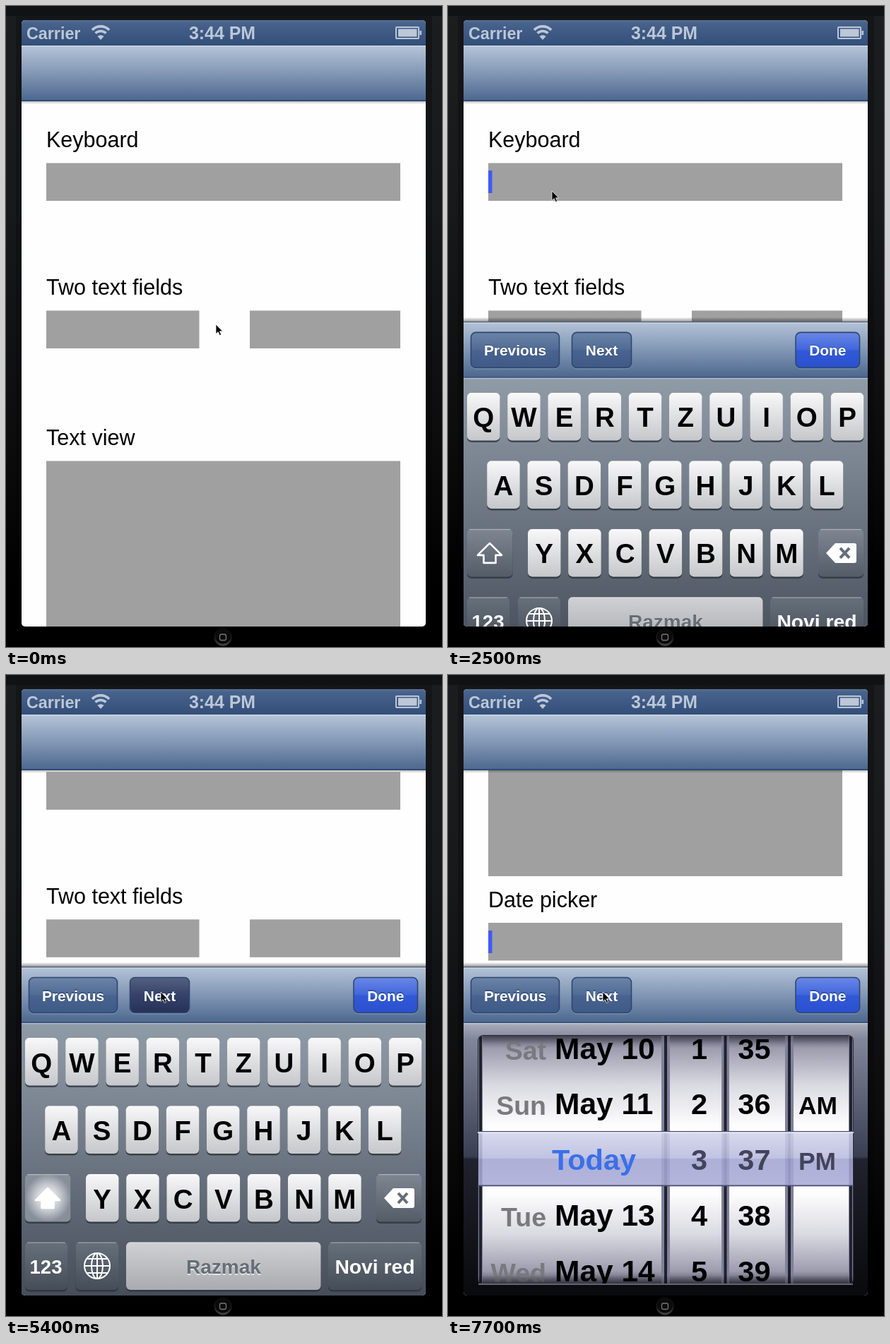
Write an HTML page that moves like this. It is 617 px wide and 908 px high and loops after 8 s.

```html
<!DOCTYPE html>
<html lang="en">
<head>
<meta charset="utf-8">
<title>Form keyboard toolbar</title>
<style>
html, body { margin: 0; width: 100%; height: 100%; overflow: hidden; background: #050506; }
svg { display: block; width: 617px; height: 908px; }
text { font-family: "Liberation Sans", Arial, Helvetica, sans-serif; white-space: pre; }
.b { font-weight: bold; }
</style>
</head>
<body>
<svg id="stage" viewBox="0 0 617 908" xmlns="http://www.w3.org/2000/svg"></svg>
<script>
const stage = document.getElementById('stage');

const rect = (x, y, w, h, fill, more = '') =>
  `<rect x="${x}" y="${y}" width="${w}" height="${h}" fill="${fill}" ${more}/>`;
const text = (x, y, size, str, fill = '#000', more = '') =>
  `<text x="${x}" y="${y}" font-size="${size}" fill="${fill}" ${more}>${str}</text>`;
const bold = (x, y, size, str, fill, anchor = 'middle', more = '') =>
  text(x, y, size, str, fill, `class="b" text-anchor="${anchor}" ${more}`);
const path = (d, more) => `<path d="${d}" ${more}/>`;

// Vertical gradient; stops are "offset colour opacity"
const grad = (id, ...stops) =>
  `<linearGradient id="${id}" x2="0" y2="1">${stops.map(s => {
    const [o, c, a = 1] = s.split(' ');
    return `<stop offset="${o}" stop-color="${c}" stop-opacity="${a}"/>`;
  }).join('')}</linearGradient>`;

const defs = `<defs>
  ${grad('body', '0 #1c1d1f', '.3 #18191b', '.7 #0b0b0c', '.9 #000')}
  ${grad('status', '0 #566f95', '.12 #47628b', '1 #334e78')}
  ${grad('bar', '0 #b5c4d8', '.48 #8499b6', '1 #4b668d')}
  ${grad('fade', '0 #000 .25', '1 #000 0')}
  ${grad('rise', '0 #000 0', '1 #000 .4')}
  ${grad('btn', '0 #6c84a7', '.48 #506b95', '.52 #486390', '1 #3f5a85')}
  ${grad('press', '0 #56617f', '.48 #36426a', '1 #263157')}
  ${grad('done', '0 #6b87e6', '.48 #4167dc', '.52 #3159d6', '1 #2b50cf')}
  ${grad('board', '0 #909ba8', '.3 #7c8692', '1 #454e59')}
  ${grad('key', '0 #f8f8f9', '1 #c6c7ca')}
  ${grad('dark', '0 #7d8691', '1 #535c67')}
  ${grad('low', '0 #66707b', '1 #454d58')}
  ${grad('space', '0 #d0d1d4', '1 #a9abb0')}
  ${grad('home', '0 #101011', '.6 #1c1c1d', '1 #4a4a4c')}
  ${grad('case', '0 #a9adbb', '.06 #81869a', '.49 #3a3e51', '.5 #20222d', '1 #090a0d')}
  ${grad('wheel', '0 #555568', '.05 #9c9cae', '.2 #dadae2', '.36 #fdfdfe', '.64 #fdfdfe', '.8 #dadae2', '.95 #9c9cae', '1 #555568')}
  ${grad('band', '0 #d3d5ec', '.49 #b9bbdf', '.51 #a3a5d3', '1 #a9abd8')}
  <radialGradient id="glow"><stop offset=".1" stop-color="#f6f7f8"/><stop offset=".55" stop-color="#c6cad0"/><stop offset="1" stop-color="#878f9b"/></radialGradient>
  <clipPath id="screen"><rect x="22" y="20" width="572" height="859" rx="5"/></clipPath>
  <clipPath id="view"><rect x="22" y="135" width="572" height="744"/></clipPath>
  <clipPath id="drum"><rect x="43" y="511" width="530" height="351" rx="6"/></clipPath>
</defs>`;

function statusBar() {
  const c = '#bcc7d8';
  const arc = r => path(`M${134 - r * .71} ${46 - r * .71}A${r} ${r} 0 0 1 ${134 + r * .71} ${46 - r * .71}`,
    `fill="none" stroke="${c}" stroke-width="3.6"`);
  return rect(22, 20, 572, 36, 'url(#status)')
    + bold(29, 47, 23.3, 'Carrier', c, 'start') + bold(306, 47, 24.9, '3:44 PM', c)
    + arc(17) + arc(10.5) + path('M134 48l-4.5-5a6.5 6.5 0 0 1 9 0z', `fill="${c}"`)
    + rect(552, 30, 32, 16, 'none', `stroke="${c}" stroke-width="2" rx="1"`)
    + rect(555, 32.5, 26.5, 11, c) + rect(585.5, 35, 2.5, 6, c);
}

function navBar() {
  return rect(22, 56, 572, 79, 'url(#bar)') + rect(22, 56, 572, 1.5, '#cdd8e5')
    + rect(22, 133, 572, 2, '#2f4a77') + rect(22, 135, 572, 4, 'url(#fade)');
}

function form() {
  const g = '#a0a0a0';
  const label = (y, s) => text(57, y, 30.5, s);
  return label(200, 'Keyboard') + rect(57, 222.5, 501, 53.5, g)
    + label(409, 'Two text fields') + rect(57, 431.5, 216.5, 53.5, g) + rect(345, 431.5, 213, 53.5, g)
    + label(622, 'Text view') + rect(57, 644.5, 501, 357.5, g)
    + label(1046, 'Date picker') + rect(57, 1068, 501, 53.5, g)
    + rect(0, 0, 5.5, 32, '#3d5cf5', 'id="caret"');
}

function toolbar() {
  const button = (x, w, s, fill, id) =>
    rect(x, 430, w, 50.5, '#93a9c5', 'rx="8" opacity=".6"')
    + rect(x + .5, 428.5, w - 1, 50, `url(#${fill})`, `id="${id}" rx="7" stroke="#2e4670" stroke-width="1.6"`)
    + bold(x + w / 2, 460, 20.9, s, '#2c4268', 'middle', 'opacity=".6"')
    + bold(x + w / 2, 461.5, 20.9, s, '#fff');
  return rect(22, 407, 572, 6, 'url(#rise)') + rect(22, 413, 572, 80, 'url(#bar)')
    + rect(22, 413, 572, 1.5, '#4b5b72') + rect(22, 414.5, 572, 1.5, '#c5d2e2')
    + rect(22, 491.5, 572, 1.5, '#344e78')
    + button(32, 126, 'Previous', 'btn', 'prev') + button(175, 85, 'Next', 'btn', 'next')
    + button(491.5, 91.5, 'Done', 'done', 'done-btn');
}

function keyboard() {
  const cap = (x, y, w, fill, id = '') =>
    rect(x, y + 2, w, 68, '#29313a', 'rx="6" opacity=".75"')
    + rect(x, y, w, 67.5, `url(#${fill})`, `rx="6" ${id}`)
    + rect(x + 3, y, w - 6, 1.3, '#fff', 'opacity=".35"');
  const row = (keys, x0, y) => [...keys].map((k, i) => {
    const x = x0 + i * 57.2;
    return cap(x, y, 46.5, 'key') + bold(x + 23.2, y + 48.5, 38.5, k, '#000');
  }).join('');
  const arrow = 'M59 727l17 17h-8.5v11h-17v-11h-8.5z';
  const globe = [18, 8].map(r => `<ellipse cx="129" cy="837" rx="${r}" ry="18"/>`).join('')
    + '<path d="M129 819v36M111 837h36M114.5 827h29M114.5 847h29"/>';
  return rect(22, 493, 572, 386, 'url(#board)') + rect(22, 493, 572, 1.5, '#b1bac5')
    + row('QWERTZUIOP', 27, 514) + row('ASDFGHJKL', 55.2, 610.5) + row('YXCVBNM', 113, 707)
    + cap(27, 707, 64.5, 'dark', 'id="shift"')
    + path(arrow, 'id="arrow" fill="none" stroke="#fff" stroke-width="2.6" stroke-linejoin="round"')
    + cap(524, 707, 64, 'dark')
    + path('M535 741l13-14h27q3 0 3 3v22q0 3-3 3h-27z', 'fill="#fff"')
    + path('M555 734l13 14m0-14l-13 14', 'stroke="#646d78" stroke-width="4"')
    + cap(27, 803.5, 60, 'low') + bold(56.5, 848, 27.5, '123', '#fff')
    + cap(98.5, 803.5, 60.5, 'low') + `<g fill="none" stroke="#fff" stroke-width="2">${globe}</g>`
    + cap(170, 803.5, 275.5, 'space')
    + bold(308, 849.5, 28, 'Razmak', '#e4e5e7') + bold(308, 848, 28, 'Razmak', '#666d77')
    + cap(456, 803.5, 132, 'low') + bold(522, 848, 28.3, 'Novi red', '#fff');
}

function picker() {
  const days = ['Sat', 'Sun', '', 'Tue', 'Wed'];
  const chosen = '#43435a';
  const rows = days.map((d, i) => {
    const y = 543.5 + i * 78.8, c = d ? '#000' : chosen;
    return (d ? bold(139, y + 1, 37.5, d, '#79797e', 'end') + bold(151, y, 42.5, 'May ' + (10 + i), c, 'start')
              : bold(147, y, 41.5, 'Today', '#3a70e8', 'start'))
      + bold(367, y, 41.5, i + 1, c, 'end') + bold(456.5, y, 41.5, 35 + i, c, 'end');
  }).join('');
  const gap = (x, w) => rect(x, 511, w, 351, '#7f8098') + rect(x + w / 2 - 2, 511, 4, 351, '#20212e');
  const gaps = gap(43, 6) + gap(302, 12) + gap(387, 11) + gap(477, 12) + gap(567, 6);
  return rect(22, 493, 572, 386, 'url(#case)') + rect(22, 493, 572, 1.5, '#c3c7d2')
    + rect(42, 510, 532, 354, '#262835', 'rx="8"')
    + `<g clip-path="url(#drum)">${rect(43, 511, 530, 351, 'url(#wheel)')}${gaps}`
    + rect(43, 647, 530, 76, 'url(#band)', 'opacity=".88"') + rows
    + bold(496, 622, 35.4, 'AM', '#000', 'start') + bold(496, 701, 35.4, 'PM', chosen, 'start')
    + rect(43, 511, 530, 12, 'url(#fade)') + rect(43, 850, 530, 12, 'url(#rise)') + '</g>'
    + rect(42, 646, 532, 1.5, '#4b4e72') + rect(42, 647.5, 532, 1.5, '#f0f1fb')
    + rect(42, 722.5, 532, 1.8, '#4b4e72')
    + rect(43, 862, 530, 2, '#626578');
}

stage.innerHTML = defs + rect(0, 0, 617, 908, 'url(#body)') + rect(0, 0, 617, 14, '#111214')
  + rect(14, 14, 589, 880, '#000', 'opacity=".25"')
  + '<circle cx="307" cy="894" r="12.5" fill="url(#home)"/><circle cx="307" cy="892.5" r="11" fill="#0b0b0c"/>'
  + rect(302.5, 890, 9, 8.5, 'none', 'rx="2.5" stroke="#777" stroke-width="1.3"')
  + `<g clip-path="url(#screen)">${rect(22, 20, 572, 859, '#fefefe')}
     <g clip-path="url(#view)"><g id="form">${form()}</g></g>
     ${statusBar()}${navBar()}
     <g id="input">${toolbar()}<g id="keys">${keyboard()}</g><g id="picker">${picker()}</g></g></g>`
  + path('M0 0V13.5L3.2 10.6L5.4 15.6L7.6 14.6L5.4 9.8H9.6Z',
    'id="cursor" fill="#000" stroke="#fff" stroke-width=".9" stroke-opacity=".8"');

const el = id => document.getElementById(id);
const ease = (t, from, ms) => {
  const p = Math.min(1, Math.max(0, (t - from) / ms));
  return p * p * (3 - 2 * p);
};
const within = (t, a, b) => t >= a && t < b;

// time, x, y of the pointer tip
const route = [[1300, 297, 451], [1400, 268, 424], [1600, 236, 386], [1900, 179, 316], [2000, 147, 262],
  [2700, 147, 262], [3100, 160, 315], [3300, 160, 315], [3700, 219, 449]];
function pointer(t) {
  const i = route.findIndex(p => p[0] > t);
  if (i == 0) return route[0].slice(1);
  if (i < 0) return route.at(-1).slice(1);
  const [a, b] = [route[i - 1], route[i]], p = (t - a[0]) / (b[0] - a[0]);
  return [1, 2].map(k => a[k] + (b[k] - a[k]) * p);
}

// start, end, x, y of the caret in form space
const carets = [[2300, 2900, 57, 233], [3400, 3900, 57, 233], [3900, 4750, 57, 442.5],
  [4750, 5370, 345, 442.5], [5380, 6400, 74, 660], [7000, 8000, 57, 1079]];
const presses = [[3780, 3930], [4650, 4780], [5250, 5470], [6900, 7030]];

function draw(t) {
  const scroll = 80.5 * ease(t, 3900, 300) + 366.5 * ease(t, 5381, 300) + 270 * ease(t, 7000, 300);
  el('form').setAttribute('transform', `translate(0 ${-scroll})`);
  el('input').setAttribute('transform', `translate(0 ${475 * (1 - ease(t, 2250, 300))})`);
  el('cursor').setAttribute('transform', `translate(${pointer(t)})`);

  const caret = carets.find(c => within(t, c[0], c[1]));
  el('caret').setAttribute('opacity', caret ? 1 : 0);
  if (caret) el('caret').setAttribute('transform', `translate(${caret[2]} ${caret[3]})`);

  const down = presses.some(p => within(t, ...p));
  el('next').setAttribute('fill', `url(#${down ? 'press' : 'btn'})`);

  const caps = t >= 5381;
  el('shift').setAttribute('fill', `url(#${caps ? 'glow' : 'dark'})`);
  el('arrow').setAttribute('fill', caps ? '#fff' : 'none');

  const dates = t >= 7000;
  el('keys').style.display = dates ? 'none' : '';
  el('picker').style.display = dates ? '' : 'none';
}

const start = performance.now();
function frame() {
  draw((performance.now() - start) % 8000);
  requestAnimationFrame(frame);
}
draw(0);
requestAnimationFrame(frame);
</script>
</body>
</html>
```
